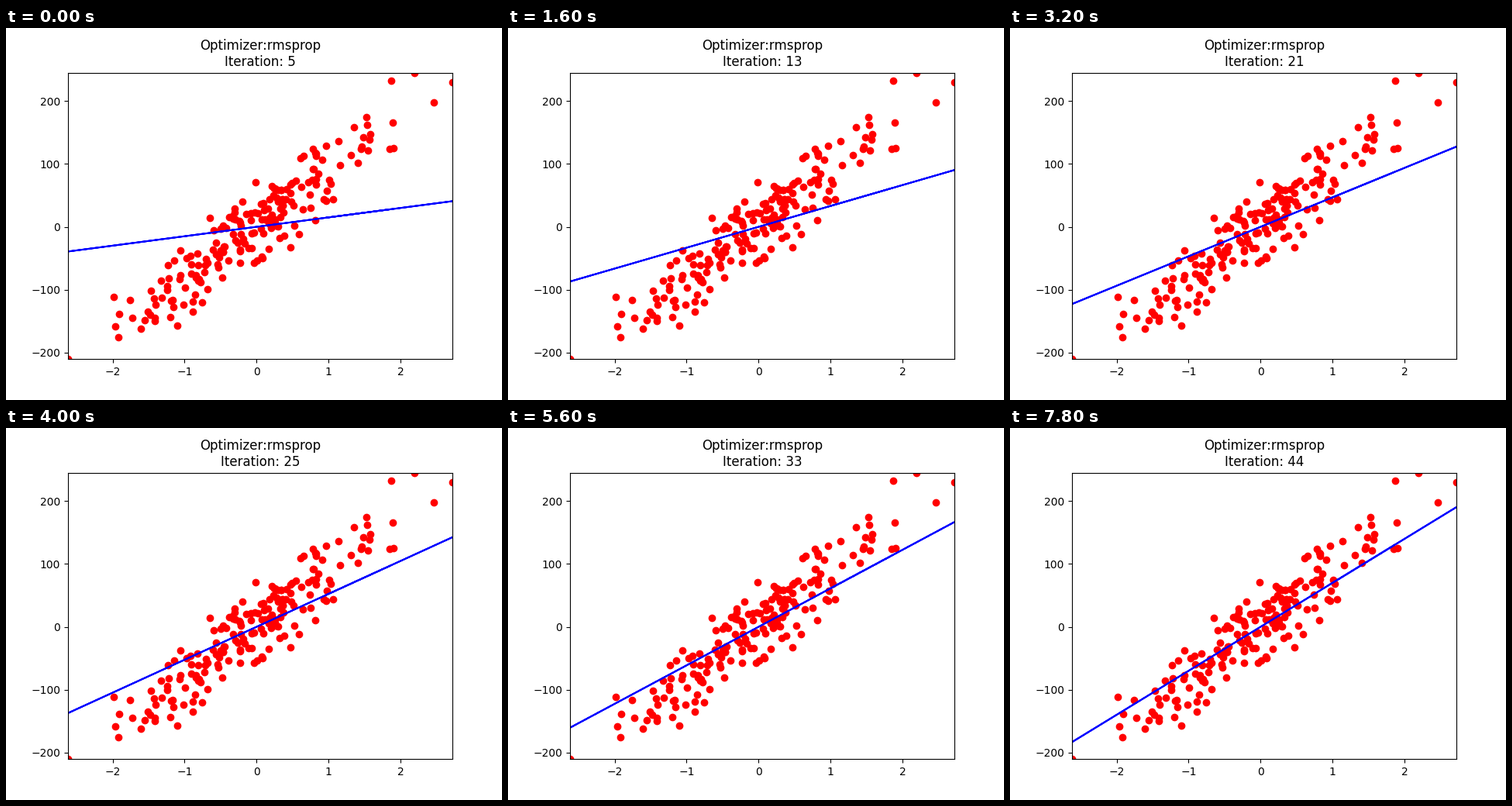
Write a matplotlib script that moves like this. It is 640 px wide and 480 px high and loops after 8000 ms.

```python
import numpy as np
import matplotlib.pyplot as plt
from matplotlib.animation import FuncAnimation

SAMPLES = 200
NOISE = 30
FIRST, FRAMES, STEP_MS = 5, 40, 200
GOAL, START_GAP, DECAY = 88.0, 73.0, 0.96474


def make_data():
    """Noisy linear data with one feature, in shuffled order."""
    rng = np.random.RandomState(42)
    x = rng.standard_normal(SAMPLES)
    slope = 100 * rng.uniform()
    y = slope * x + rng.normal(scale=NOISE, size=SAMPLES)
    order = np.arange(SAMPLES)
    rng.shuffle(order)
    return x[order], y[order]


def weight(step):
    """Slope of the fit, closing in on its goal at a fixed rate."""
    return GOAL - START_GAP * DECAY ** step


x, y = make_data()

fig, ax = plt.subplots(figsize=(6.4, 4.8), dpi=100)
ax.plot(x, y, "ro")
fit, = ax.plot(x, weight(0) * x, "b-")
ax.set_xlim(x.min(), x.max())
ax.set_ylim(y.min(), y.max())
title = ax.set_title("")


def update(step):
    fit.set_ydata(weight(step) * x)
    title.set_text(f"Optimizer:rmsprop\nIteration: {FIRST + step}")
    return fit, title


anim = FuncAnimation(fig, update, frames=FRAMES, interval=STEP_MS,
                     repeat=True, repeat_delay=0)
plt.show()
```
